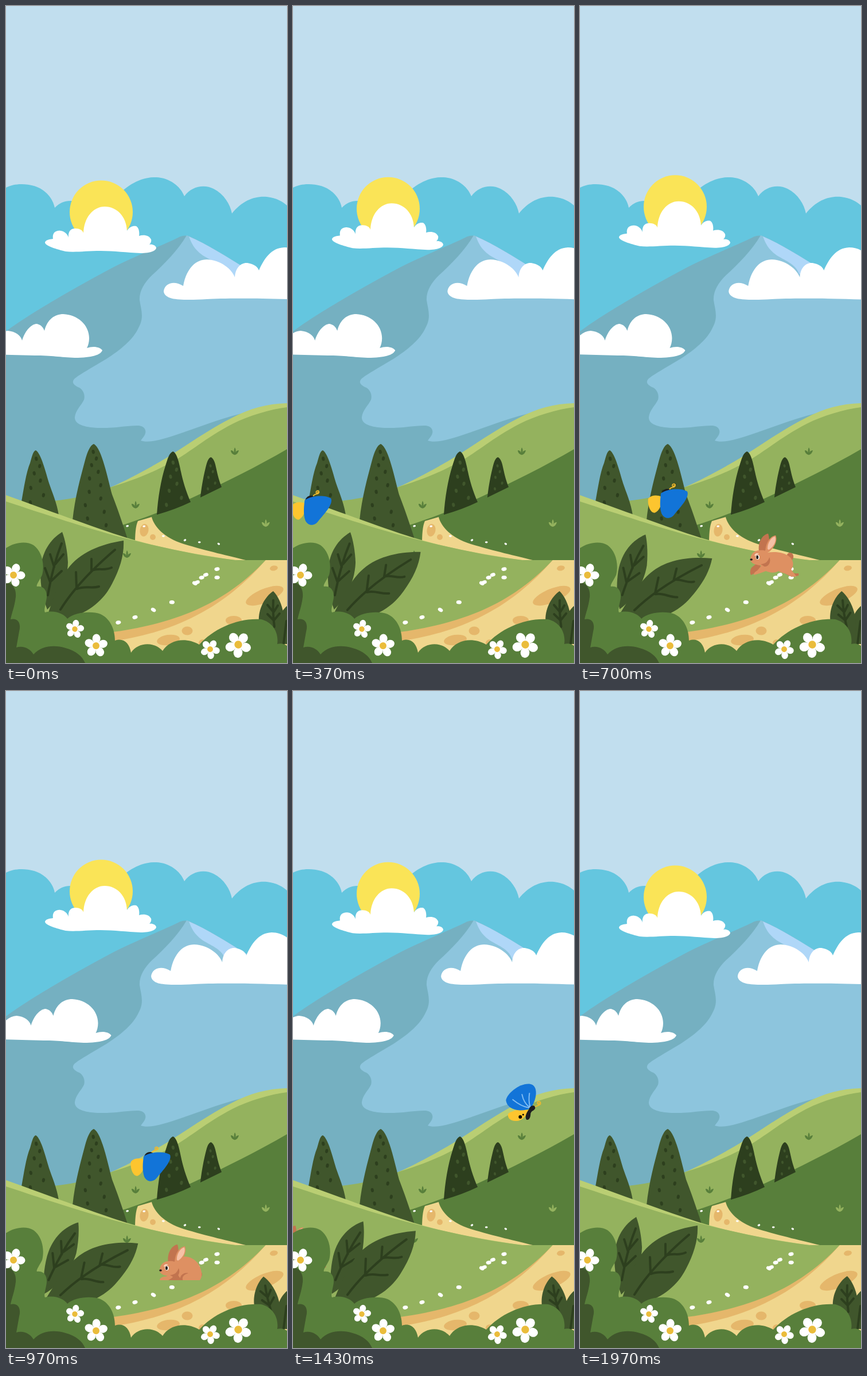
Write an HTML page that moves like this. It is 490 by 1143 pixels and loops after 2000 ms.

```html
<!DOCTYPE html>
<html lang="en">
<head>
<meta charset="utf-8">
<title>Mountain meadow</title>
<style>
  html, body { margin: 0; width: 100%; height: 100%; overflow: hidden; background: #c1deee; }
  svg { display: block; width: 100%; height: 100%; }
  .white { fill: #fff; }
  .meadow { fill: #94b25e; }
  .rim { fill: #bace73; }
  .bush { fill: #587f3b; }
  .leaf { fill: #40562c; }
  .dark { fill: #2d3f1e; }
  .sand { fill: #f0d68d; }
  .soil { fill: #e5b76b; }
  .vein { fill: none; stroke: #2d3f1e; stroke-width: 4; stroke-linecap: round; }
  .fur { fill: #de9062; }
  .shade { fill: #c2744f; }
  .blue { fill: #1274d8; }
  .yellow { fill: #fdc52f; }
  .feeler { fill: none; stroke: #f0b92d; stroke-width: 1.8; stroke-linecap: round; }
</style>
</head>
<body>
<svg viewBox="0 0 490 1143" preserveAspectRatio="none">
  <defs>
    <g id="flower">
      <g class="white">
        <ellipse id="petal" cy="-12.5" rx="7" ry="8"/>
        <use href="#petal" transform="rotate(72)"/>
        <use href="#petal" transform="rotate(144)"/>
        <use href="#petal" transform="rotate(216)"/>
        <use href="#petal" transform="rotate(288)"/>
        <circle r="8"/>
      </g>
      <circle r="6" fill="#eabc3b"/>
    </g>
    <path id="tuft" d="M0,6 C-4,5 -7,2 -7,-2 C-4,-2 -2,0 -1,2 C-2,-2 -1,-5 0,-7 C2,-4 2,-1 1,2 C2,-1 5,-2 7,-2 C6,2 4,5 0,6Z"/>
    <g id="head">
      <path class="shade" d="M313,949 C310,934 319,919 329,918 C333,930 329,942 323,949Z"/>
      <path class="fur" d="M324,950 C324,935 332,922 342,921 C346,931 339,943 330,950Z"/>
      <path fill="#f6c1a6" d="M328,945 C327,935 334,924 341,923 C344,932 337,942 330,946Z"/>
      <path class="fur" d="M298,964 C298,954 304,947 314,947 C325,945 335,952 332,963 C329,973 318,975 309,972 C303,971 299,968 298,964Z"/>
      <path class="shade" d="M316,971 C324,971 329,966 331,959 C335,967 329,977 322,975Z"/>
      <path fill="#f8d6c2" d="M305,955 Q308,950 313,953 Q309,954 306,957Z"/>
      <ellipse cx="310.5" cy="959" rx="3.2" ry="4" fill="#fff"/>
      <ellipse cx="310" cy="959" rx="2" ry="3.2" fill="#25201e"/>
      <ellipse cx="299.5" cy="963" rx="2.3" ry="1.8" fill="#25201e"/>
    </g>
  </defs>

  <rect width="490" height="1143" fill="#c1deee"/>
  <path fill="#64c6df" d="M0,316 C12,309 32,308 49,313 C69,319 82,335 85,351 C95,341 106,337 122,340 L190,335 C213,308 240,297 262,298 C285,299 304,313 311,331 C324,313 346,310 362,318 C380,327 391,345 394,361 C412,338 435,330 455,332 C472,334 482,340 490,347 V600 H0Z"/>
  <path fill="#75b0c1" d="M0,566 C40,536 120,490 190,453 C240,429 280,413 300,403 Q308,398 318,400 C350,414 385,436 420,458 L490,500 V880 H0Z"/>
  <path fill="#8dc5dd" d="M315,399 C300,425 275,450 255,468 C240,482 232,498 233,512 C236,530 241,542 231,560 C222,580 200,598 175,614 C150,629 125,643 119,649 C114,655 118,660 128,664 C136,669 138,678 136,685 C132,694 122,702 120,715 C119,727 135,733 160,734 C190,735 215,729 232,730 C245,732 245,742 241,748 L235,756 C250,762 280,752 320,738 C360,724 400,709 440,703 L490,697 V500 L420,458 Q350,414 318,400Z"/>
  <path fill="#afd7f8" d="M319,401 C350,414 385,436 420,458 L400,475 L382,466 C376,448 355,442 342,433 C328,423 323,412 319,401Z"/>

  <g id="sun">
    <circle cx="166" cy="358.5" r="55" fill="#fae457"/>
    <path class="white" d="M68,412 C68,407 76,406 82,405 C80,394 88,390 95,391 C103,392 108,398 109,403 C108,392 113,387 121,387 C128,387 134,390 135,395 C136,368 152,349 172,349 C194,349 210,367 211,391 C215,384 222,382 227,383 C232,386 233,394 232,400 C240,397 250,399 253,406 C254,410 252,413 250,415 C256,414 262,417 262,421 C261,427 248,430 235,430 C210,429 190,426 165,426 C140,426 120,429 104,427 C88,423 70,418 68,412Z"/>
  </g>
  <path id="rightCloud" class="white" d="M275,496 C277,482 293,477 309,487 C315,455 332,441 350,441 C375,442 394,458 399,472 C400,455 410,446 421,447 C433,449 439,454 441,460 C450,440 462,421 485,420 C510,420 530,440 540,470 V512 C460,508 380,508 350,510 C320,512 300,511 290,509 C281,507 275,502 275,496Z"/>
  <path id="leftCloud" class="white" d="M-30,606 V595 C-22,575 -10,566 3,565 C16,566 26,573 28,582 C34,563 45,553 54,553 C62,555 65,560 67,565 C72,545 85,536 100,536 C125,537 145,555 145,578 C145,585 143,591 141,595 C152,591 164,593 168,599 C165,607 150,612 120,612 C95,611 80,608 50,608Z"/>

  <path class="rim" d="M490,691 C455,692 425,700 393,717 C355,736 320,761 285,783 C250,804 215,823 183,837 V860 H490Z"/>
  <path class="meadow" d="M490,698 C460,702 425,712 395,727 C350,750 320,777 290,793 C250,815 215,827 183,837 C150,850 110,860 60,863 V980 H490Z"/>
  <path class="bush" d="M490,771 C440,800 380,830 330,853 C290,872 250,888 200,904 V970 H490Z"/>
  <path class="sand" d="M230,896 L254,889 C258,905 275,925 310,936 C350,948 390,957 418,964 L390,975 L225,940 C225,918 226,905 230,896Z"/>
  <g class="soil">
    <ellipse cx="241" cy="912" rx="7.5" ry="11" transform="rotate(10 241 912)"/>
    <circle cx="256" cy="924" r="5"/>
  </g>
  <path class="leaf" d="M52,773 C47,774 45,785 42,795 C35,812 31,840 27,862 L92,886 C89,865 80,845 75,830 C69,810 61,778 52,773Z"/>
  <path class="leaf" d="M153,762 C147,764 142,775 138,790 C130,820 120,855 116,895 L212,927 C205,905 193,870 185,850 C178,825 167,768 153,762Z"/>
  <path class="dark" d="M291,775 C284,778 282,788 278,800 C270,825 265,855 263,885 Q295,876 322,863 C314,845 308,825 305,810 C302,795 298,777 291,775Z"/>
  <path class="dark" d="M357,785 C351,787 349,800 346,812 C342,830 340,845 339,855 L376,837 C370,822 368,810 366,802 C364,792 361,786 357,785Z"/>
  <g id="darkSpots" class="dark"></g>
  <g id="lightSpots" class="leaf"></g>

  <path class="rim" d="M0,851 C70,876 150,906 210,925 C260,940 320,953 400,964 V1000 H0Z"/>
  <path class="meadow" d="M0,862 C70,885 140,908 200,924 C270,942 340,957 400,964 H490 V1143 H0Z"/>
  <path class="soil" d="M453,964 C395,1025 320,1072 180,1090 V1143 H490 V964Z"/>
  <path class="sand" d="M453,964 H490 V1143 H180 V1106 C300,1090 385,1042 453,964Z"/>
  <g class="soil">
    <ellipse cx="467" cy="978" rx="7" ry="4.5" transform="rotate(-10 467 978)"/>
    <ellipse cx="451" cy="1026" rx="35" ry="12" transform="rotate(-22 451 1026)"/>
    <ellipse cx="397" cy="1069" rx="14" ry="8"/>
    <ellipse cx="316" cy="1087" rx="9.5" ry="7.5"/>
    <ellipse cx="283" cy="1103" rx="20" ry="9" transform="rotate(-8 283 1103)"/>
    <ellipse cx="343" cy="1108" rx="7" ry="6"/>
  </g>
  <g class="bush">
    <use href="#tuft" x="399" y="775"/>
    <use href="#tuft" x="226" y="868"/>
    <use href="#tuft" x="211" y="954"/>
  </g>
  <use class="meadow" href="#tuft" x="453" y="900"/>
  <g id="petals" class="white"></g>

  <g id="rabbitRun">
    <ellipse class="shade" cx="367" cy="958" rx="6" ry="7"/>
    <path class="shade" d="M311,968 L300,977 C297,982 297,986 299,990 L305,987 L318,979Z M356,974 C365,984 371,988 382,987 V991 L370,993 C360,989 352,984 348,978Z"/>
    <path class="fur" d="M318,953 C335,948 355,949 366,958 C375,966 373,976 369,980 C372,986 377,989 378,993 L367,992 C360,986 352,987 347,983 C338,988 330,985 325,983 L314,987 L304,990 Q303,986 310,982 L316,975Z"/>
    <use href="#head"/>
  </g>
  <g id="rabbitSit">
    <circle class="shade" cx="336" cy="1015" r="6"/>
    <path class="fur" d="M286,998 C296,978 326,980 336,998 C342,1008 343,1019 338,1025 H268 C268,1020 275,1019 281,1018Z"/>
    <path class="shade" d="M283,1025 C290,1022 296,1015 299,1008 C299,1017 302,1021 309,1025Z M304,1025 C302,1016 311,1011 318,1013 C310,1015 307,1019 308,1025Z"/>
    <use href="#head" x="-30" y="45"/>
  </g>

  <g id="butterfly">
    <g id="wingsDown">
      <path class="feeler" d="M4,-2 C6,-7 12,-4 14,-8 C15,-13 8,-12 9,-8 C10,-6 12,-7 12,-9"/>
      <path fill="#1d1d20" d="M-10,5 C-8,-2 0,-5 5,-1 L3,6 L-8,9Z"/>
      <path class="yellow" d="M-33,14 C-28,8 -18,7 -10,11 C-8,24 -14,36 -22,39 C-31,39 -35,22 -33,14Z"/>
      <path class="blue" d="M-11,5 C2,-4 26,-4 35,2 C39,12 24,28 13,41 C7,50 -5,51 -10,40 C-14,28 -12,14 -11,5Z"/>
    </g>
    <g id="wingsUp" transform="translate(-3 -2)">
      <path class="feeler" d="M4,-2 C6,-6 11,-4 15,-8 C17,-13 10,-15 10,-10 C10,-7 13,-8 13,-10"/>
      <path class="yellow" d="M-41,8 C-30,2 -14,-1 -5,3 C-10,14 -19,22 -28,21 C-38,21 -43,15 -41,8Z"/>
      <path class="blue" d="M-45,-15 C-43,-27 -20,-46 -2,-43 C12,-40 9,-16 -2,-1 C-14,5 -42,5 -45,-15Z"/>
      <path fill="none" stroke="#7fbcf3" stroke-width="2" stroke-linecap="round" d="M-5,-2 Q-18,-4 -33,-16 M-4,-3 Q-14,-10 -17,-25 M-3,-4 Q-6,-14 -4,-27"/>
      <path fill="#1d1d20" d="M-5,1 C-3,-6 5,-8 6,-2 C6,3 0,2 -2,8 C-2,14 -4,20 -9,19 C-13,14 -9,6 -5,1Z"/>
      <circle cx="-20" cy="14" r="3"/>
      <circle cx="-15" cy="10" r="1.5"/>
    </g>
  </g>

  <g id="smallLeaf">
    <path class="leaf" d="M98,915 C78,927 61,950 60,985 C60,1010 64,1030 72,1050 C90,1032 107,1005 108,968 C107,948 103,928 98,915Z"/>
    <path class="vein" d="M73,1025 C78,995 85,965 97,935 M77,1002 L68,978 M84,976 L77,954 M78,1001 L97,983 M86,971 L100,954"/>
  </g>
  <g id="bigLeaf">
    <path class="leaf" d="M205,930 C165,936 128,951 107,980 C92,1000 80,1035 68,1075 L95,1069 C140,1060 170,1035 185,1005 C199,978 206,955 205,930Z"/>
    <path class="vein" stroke-width="4.5" d="M95,1050 C118,1013 150,980 190,946 M123,1014 L122,985 M149,983 L149,962 M124,1014 C138,1008 148,1014 162,1010 M150,982 C162,977 172,983 184,977"/>
  </g>
  <path class="leaf" d="M495,1040 C480,1050 469,1068 468,1110 H495Z"/>
  <path class="vein" stroke-width="3" d="M484,1110 L489,1070"/>
  <g id="rightLeaf">
    <path class="leaf" d="M466,1018 C452,1027 439,1049 441,1072 L450,1112 H478 C484,1090 486,1075 484,1058 C481,1040 474,1026 466,1018Z"/>
    <path class="vein" stroke-width="3" d="M466,1034 Q465,1055 468,1080 M466,1054 L456,1042 M467,1069 L456,1058 M467,1054 L474,1043 M467,1069 L477,1057"/>
  </g>

  <path class="bush" d="M0,943 C15,933 35,930 48,938 C62,948 68,970 63,990 C58,1000 52,1008 54,1010 C66,1008 74,1018 70,1035 C68,1045 66,1052 68,1055 C85,1050 102,1058 107,1066 C120,1054 150,1052 165,1058 C182,1066 190,1085 190,1104 C205,1099 215,1108 218,1125 C230,1107 258,1105 273,1122 C285,1103 312,1097 337,1111 C362,1083 405,1064 445,1067 C465,1072 476,1090 473,1110 C480,1108 486,1110 490,1113 V1143 H0Z"/>
  <path class="leaf" d="M0,1003 C12,1004 18,1014 17,1028 C15,1045 10,1056 8,1067 C20,1064 27,1073 23,1088 L18,1116 C30,1112 42,1118 48,1128 C62,1113 84,1111 104,1117 C122,1122 133,1131 138,1143 H0Z"/>
  <use href="#flower" transform="translate(13 990) rotate(20)"/>
  <use href="#flower" transform="translate(120 1084) rotate(10) scale(.79)"/>
  <use href="#flower" transform="translate(157 1113) rotate(3)"/>
  <use href="#flower" transform="translate(356 1119) rotate(30) scale(.83)"/>
  <use href="#flower" transform="translate(405 1111) rotate(38) scale(1.12)"/>
</svg>
<script>
const LOOP = 2000;
const { PI, sin, cos, abs } = Math;
const $ = id => document.getElementById(id);

let seed = 7;
const random = () => (seed = seed * 16807 % 2147483647) / 2147483647;
const spread = range => (random() - 0.5) * range;

function addDot(id, x, y, rx, ry, angle) {
  $(id).innerHTML += `<ellipse rx="${rx}" ry="${ry}" transform="translate(${x} ${y}) rotate(${angle})"/>`;
}

// Spots alternate sides and spread out towards the foot of the tree
function spotTree(id, x, top, height, width, count, size) {
  for (let i = 0; i < count; i++) {
    const depth = (i + 1) / (count + 0.5);
    const side = i % 2 ? 1 : -1;
    addDot(id, x + side * width * depth * (0.15 + 0.15 * random()), top + height * depth, size, size * 1.4, side * 12);
  }
}

function scatterPetals(count, x0, y0, x1, y1, jitter, size) {
  for (let i = 0; i < count; i++) {
    const u = i / (count - 1);
    addDot('petals', x0 + (x1 - x0) * u + spread(jitter), y0 + (y1 - y0) * u + spread(jitter), size, size * 0.7, spread(70));
  }
}

spotTree('darkSpots', 54, 775, 95, 62, 7, 2.6);
spotTree('darkSpots', 154, 764, 145, 85, 12, 2.6);
spotTree('lightSpots', 293, 782, 92, 56, 7, 2.6);
spotTree('lightSpots', 358, 790, 55, 32, 5, 2);
scatterPetals(6, 214, 900, 372, 940, 14, 2.4);
scatterPetals(6, 376, 982, 322, 1005, 18, 4.6);
scatterPetals(4, 288, 1036, 195, 1074, 10, 4.6);

const clamp = u => Math.min(1, Math.max(0, u));
const easeOut = u => sin(u * PI / 2);
const easeInOut = u => (1 - cos(u * PI)) / 2;

// Rises from 0 to 1 at the peak, then sinks back to 0
function swing(t, from, peak, to, rise) {
  return t < peak ? rise(clamp((t - from) / (peak - from)))
                  : 1 - easeInOut(clamp((t - peak) / (to - peak)));
}

const move = (id, x, y) => $(id).setAttribute('transform', `translate(${x} ${y})`);
const turn = (id, angle, x, y) => $(id).setAttribute('transform', `rotate(${angle} ${x} ${y})`);
const show = (id, visible) => $(id).setAttribute('visibility', visible ? 'visible' : 'hidden');

function drawButterfly(t) {
  move('butterfly', 31 + (t - 370) * 0.366, 782 + 74 * cos(PI * (t - 450) / 1300));
  const raised = t % 200 < 90;
  show('wingsUp', raised);
  show('wingsDown', !raised);
}

function drawRabbit(t) {
  const land = 780, leave = 1110, restX = 305, ground = 984;
  const before = Math.max(0, land - t), after = Math.max(0, t - leave);
  const x = restX + 0.005 * before ** 2 - 0.2155 * after ** 1.25;
  const y = ground - 29 * abs(sin(PI * before / 160)) - 20 * abs(sin(PI * after / 120));
  const sitting = t >= land && t < leave;
  move('rabbitRun', x - 337, y - 955);
  show('rabbitRun', !sitting);
  show('rabbitSit', sitting);
}

function draw(t) {
  const lean = swing(t, 220, 1170, LOOP, easeInOut);
  move('sun', 0, -10 * swing(t, 0, 950, LOOP, easeOut));
  move('rightCloud', -23 * swing(t, 0, 1130, LOOP, easeInOut), 0);
  move('leftCloud', 16 * swing(t, 0, 840, LOOP, easeOut), 0);
  turn('bigLeaf', 14.4 * swing(t, 0, 850, 1780, easeOut), 90, 1050);
  turn('smallLeaf', 16.2 * lean, 75, 1030);
  turn('rightLeaf', -11.8 * lean, 462, 1110);
  drawButterfly(t);
  drawRabbit(t);
}

const start = performance.now();
function frame() {
  draw((performance.now() - start) % LOOP);
  requestAnimationFrame(frame);
}
frame();
</script>
</body>
</html>
```
